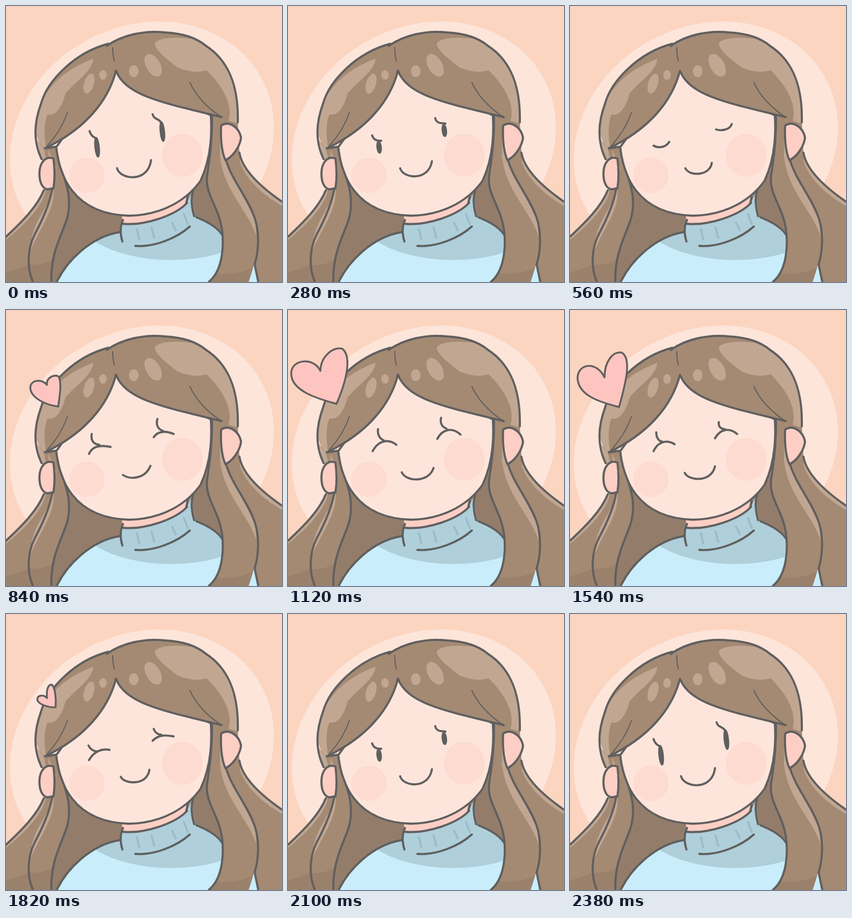
An HTML page that plays this animation: 512 px wide and 512 px high, repeating every 2520 ms.

```html
<!DOCTYPE html>
<html lang="en">
<head>
<meta charset="utf-8">
<title>Smiling girl</title>
<style>
html, body { margin: 0; width: 100%; height: 100%; overflow: hidden; background: #fcd5c0; }
svg { display: block; width: 100vw; height: 100vh; }
path { fill: none; stroke-linecap: round; stroke-linejoin: round; }
.ink { stroke: #605f5f; stroke-width: 3.9; }
.thin { stroke: #605f5f; stroke-width: 2; }
.hair { fill: #a48a73; }
.light { fill: #c1a792; }
.dark { fill: #9a816c; }
.deep { fill: #937d6a; }
.skin { fill: #fee5db; }
.pink { fill: #fdcfc4; }
.blush { fill: #fedbd0; }
.knit { fill: #c9edfa; }
.shade { fill: #afcfda; }
.rib { stroke: #9bbcc8; stroke-width: 4; }
#heart { fill: #fec5c0; stroke-width: 3.4; }
#pupils { fill: #605f5f; }
</style>
</head>
<body>
<svg viewBox="0 0 512 512">
  <rect width="512" height="512" fill="#fcd5c0"/>
  <ellipse cx="252" cy="255" rx="253" ry="217" transform="rotate(-29.3 252 255)" fill="#fde5da"/>

  <!-- hair behind the body -->
  <path class="hair" d="M0 428C30 400 58 372 72 338L95 262 218 392 212 420C160 432 115 470 93 512H0Z"/>
  <path class="light" d="M0 430C30 402 58 376 68 343L74 342C66 374 36 404 0 434Z"/>
  <path class="deep" d="M104 308L218 385 213 419C160 428 112 475 93 512H84C83 460 100 432 112 398Q122 360 104 308Z"/>
  <path class="dark" d="M0 494Q25 487 43 480L50 512H0Z"/>
  <path class="hair" d="M335 360L380 203 430 215 433 272C438 302 470 334 512 363V512H450L403 428 350 392Z"/>
  <path class="light" d="M433 272C438 302 470 334 512 363V371C476 350 445 322 434 290Z"/>
  <path class="deep" d="M340 350L372 305Q370 350 393 385L403 428 350 392Z"/>
  <path class="ink" d="M0 428C30 400 58 372 70 342M433 272C438 302 470 334 512 363"/>

  <!-- sweater and neck -->
  <path class="knit" d="M93 512C112 475 155 428 213 419L350 392C375 400 395 412 403 428L461 478 468 512Z"/>
  <path class="shade" d="M164 436Q190 423 213 419L350 392Q390 402 403 428L402 457C335 480 225 476 164 436Z"/>
  <path class="ink" d="M94 512C112 475 155 428 213 419M348 390C375 400 395 412 403 428M461 478L468 512"/>
  <path class="pink" d="M214 385L338 345 336 368Q285 404 217 404Z"/>
  <path class="shade" d="M216 403C258 408 315 388 336 365L346 342Q344 365 352 394C315 435 260 452 214 437Q211 418 216 403Z"/>
  <path class="rib" d="M243 414L247 433M270 411L275 430M308 402L315 416M330 386L337 404"/>
  <path class="ink" d="M217 397Q209 414 216 437M217 404C258 408 315 388 336 365M337 354L334 367M347 342Q341 362 349 390M240 445C275 448 318 430 341 409"/>

  <!-- face -->
  <path class="skin ink" d="M93 262C98 310 122 386 228 389C292 388 337 358 361 324C376 292 383 250 380 203L204 110Z"/>
  <ellipse class="blush" cx="150" cy="314" rx="33" ry="33"/>
  <ellipse class="blush" cx="327" cy="277" rx="38" ry="40"/>

  <!-- side strands -->
  <path class="hair" d="M58 250L70 262H93C96 285 99 296 104 308C116 336 122 366 112 398C100 432 83 460 84 512H50C38 485 40 450 53 424C66 400 81 368 86 338L90 310 66 284Z"/>
  <path class="light" d="M88 340C92 375 65 410 46 452C45 400 79 380 86 338ZM58 250L70 264 74 282 66 286ZM80 282L78 266 93 300 89 312 88 283Z"/>
  <path class="dark" d="M43 480Q64 482 85 472L84 512H50Q42 496 43 480Z"/>
  <path class="ink" d="M93 262C96 285 99 296 104 308C116 336 122 366 112 398C100 432 83 460 84 512M86 338C81 368 66 400 53 424C40 450 38 485 50 512"/>
  <path class="hair" d="M383 203L428 206 399 222 408 285C418 322 448 354 462 395C472 430 468 460 450 512H376C404 488 408 425 393 385C382 357 370 340 373 315C377 287 384 250 383 203Z"/>
  <path class="light" d="M397 218Q397 270 408 288C418 322 448 354 462 395L465 428C450 380 405 345 397 280Z"/>
  <path class="dark" d="M390 496Q425 500 458 486L450 512H376Z"/>
  <path class="ink" d="M382 203C383 250 377 287 373 315C370 340 382 357 393 385C408 425 406 488 376 512M408 285C418 322 448 354 462 395C471 425 468 458 461 480"/>

  <!-- crown -->
  <path class="hair" d="M70 264C50 245 54 212 65 181C77 138 128 86 190 70C215 54 255 45 295 49C330 51 355 60 371 74C408 98 432 140 430 222L399 221 400 206C288 179 222 166 204 120C190 175 148 228 70 264Z"/>
  <path class="light" d="M70 263C50 245 54 212 65 181C78 148 112 116 162 98C160 122 128 140 110 163C104 188 92 205 77 201Q68 222 74 261Z"/>
  <path class="light" d="M276 72C275 61 305 56 345 61L371 74C408 98 431 140 430 218L413 213C422 180 399 146 372 119Q350 127 318 114C305 103 282 88 276 72Z"/>
  <ellipse class="light" cx="154" cy="144" rx="9" ry="19" transform="rotate(17 154 144)"/>
  <ellipse class="light" cx="180" cy="128" rx="7" ry="9"/>
  <ellipse class="light" cx="237" cy="121" rx="9" ry="11"/>
  <ellipse class="light" cx="273" cy="110" rx="13" ry="23" transform="rotate(-30 273 110)"/>
  <path class="ink" d="M66 284C50 250 52 217 65 181C77 138 128 86 190 70M187 74C215 54 255 45 295 49C330 51 355 60 371 74C408 98 432 140 430 216"/>
  <path class="ink" d="M204 120C190 175 148 228 72 264M204 120C222 166 288 179 400 206M72 264L93 261"/>
  <path class="thin" d="M198 77Q198 92 201 102M341 142Q358 178 398 205M114 198Q100 235 76 260"/>

  <!-- ears -->
  <path class="pink ink" d="M88 283C74 277 62 290 62 311C62 331 70 340 78 340L88 338Q92 314 88 283Z"/>
  <path class="pink ink" d="M399 222C413 212 432 224 436 244C434 262 420 280 407 286C400 270 398 245 399 222Z"/>

  <path id="lines" class="ink"/>
  <path id="pupils" class="thin"/>
  <path id="heart" class="ink"/>
</svg>
<script>
// Each pose: strokes of lashes, lids and mouth; then pupils and heart.
const poses = [
  { lines: "M155 232C158 242 164 244 168 246M272 201C275 212 283 207 288 217M206 301C212 323 264 328 269 286",
    pupils: "M167 244A4 18 -6 0 0 171 280A4 18 -6 0 0 167 244ZM288 215A4 18 -6 0 0 292 251A4 18 -6 0 0 288 215Z" },
  { lines: "M156 240C159 248 163 250 173 250M273 208C276 218 282 217 292 218M208 301C214 321 261 325 267 288",
    pupils: "M168 251A4 11 -6 0 0 170 273A4 11 -6 0 0 168 251ZM289 220A4 11 -6 0 0 291 242A4 11 -6 0 0 289 220Z" },
  { lines: "M155 259C163 264 178 263 184 252M271 229C280 232 297 230 300 219M214 301C222 317 260 315 263 291" },
  { lines: "M153 244Q158 254 169 255M154 271C163 255 178 249 192 252M274 213Q277 223 288 224M272 235C283 224 295 224 311 227M213 302C219 316 262 319 266 289",
    heart: "M92 173C80 174 60 168 58 159C58 150 70 149 76 156C75 142 77 131 85 131C92 138 93 158 92 173Z" },
  { lines: "M159 230C157 243 163 249 173 250M154 267C160 252 175 250 194 254M281 202C277 215 284 222 291 224M274 236C282 224 297 224 311 230M217 306C230 315 258 314 268 289",
    heart: "M97 179C78 177 46 165 45 144C46 128 68 128 76 139C74 124 93 118 98 124C104 138 99 160 97 179Z" },
  { lines: "M160 227C160 238 166 244 171 244M155 262C162 246 178 239 194 249M276 208C275 218 282 221 287 221M269 238C279 220 296 218 310 230M213 302C219 317 262 321 269 290",
    heart: "M91 180C60 172 14 160 14 125C16 98 50 95 64 125C64 95 80 76 96 79C114 90 105 130 91 180Z" },
  { lines: "M167 221C165 232 172 240 178 242M157 262C166 244 185 237 201 250M284 200C281 212 288 218 294 220M277 239C286 222 303 216 320 231M211 301C219 319 261 321 270 293",
    heart: "M90 174C56 165 4 150 6 116C8 90 49 88 60 113C61 84 86 67 101 72C118 86 110 128 90 174Z" },
  { lines: "M169 220C166 231 174 240 180 242M158 262C167 243 187 236 203 250M286 197C283 210 290 217 296 220M279 239C288 222 305 215 325 231M211 301C219 320 261 321 270 294",
    heart: "M84 137C50 127 4 115 6 87C10 63 46 61 57 77C60 48 86 41 102 48C119 58 109 95 84 137Z" }
];
const order = "001123456765432110", step = 140;
const parts = ["lines", "pupils", "heart"].map(id => document.getElementById(id));

function draw(now) {
  const pose = poses[order[Math.floor(now / step) % order.length]];
  for (const part of parts) part.setAttribute("d", pose[part.id] || "");
  requestAnimationFrame(() => draw(performance.now() - start));
}
const start = performance.now();
draw(0);
</script>
</body>
</html>
```
